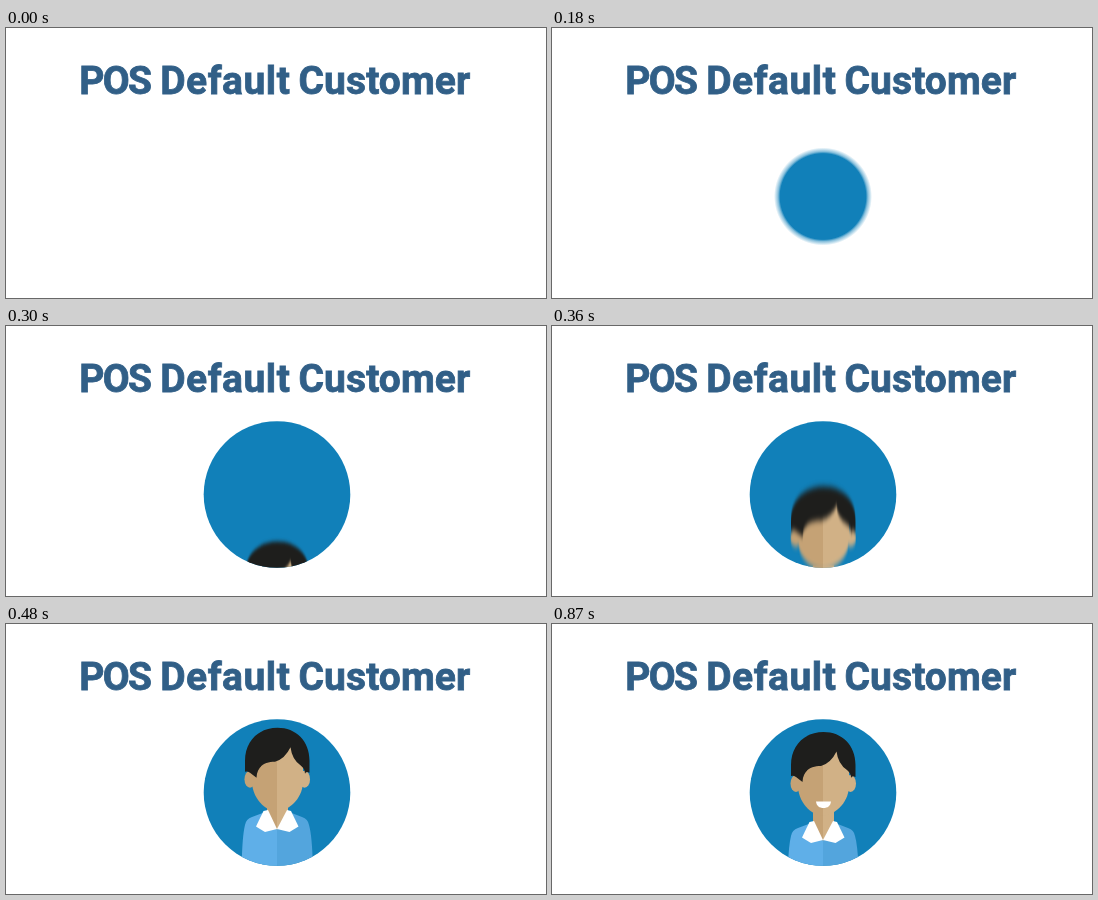
An HTML page for the animation above (3150 ms loop, 540 by 270 pixels).

```html
<!DOCTYPE html>
<html lang="en">
<head>
<meta charset="utf-8">
<title>POS Default Customer</title>
<style>
html, body { margin: 0; width: 100%; height: 100%; overflow: hidden; background: #fff; }
svg { display: block; width: 540px; height: 270px; }
text { font: 700 39px Roboto, "Open Sans", sans-serif; fill: #315f87; stroke: #315f87; stroke-width: 0.8px; }
.dark { fill: #c5a275; }
.light { fill: #d1b186; }
.white { fill: #fff; }
</style>
</head>
<body>
<svg viewBox="0 0 540 270">
  <defs>
    <clipPath id="disc"><circle cx="271" cy="168.5" r="73.3"/></clipPath>
    <radialGradient id="edge">
      <stop offset="1" stop-color="#1180b9"/>
      <stop offset="1" stop-color="#1180b9" stop-opacity="0.5"/>
      <stop offset="1" stop-color="#1180b9" stop-opacity="0"/>
    </radialGradient>
    <filter id="rise" filterUnits="userSpaceOnUse" x="150" y="-100" width="240" height="500" color-interpolation-filters="sRGB">
      <feGaussianBlur stdDeviation="0"/>
    </filter>
    <filter id="lift" filterUnits="userSpaceOnUse" x="150" y="-100" width="240" height="500" color-interpolation-filters="sRGB">
      <feGaussianBlur stdDeviation="0"/>
    </filter>
  </defs>

  <text y="65.5"><tspan x="73.2" letter-spacing="-1.6">POS</tspan><tspan x="154.2" letter-spacing="0.5">Default</tspan><tspan x="292.4" letter-spacing="0.1">Customer</tspan></text>

  <circle id="back" cx="271" cy="168.5" r="0"/>

  <g clip-path="url(#disc)">
    <g id="body">
      <path fill="#5fafe8" d="M259 199L246 204Q240 206 239 212Q235.500 226 235.500 270H271V199Z"/>
      <path fill="#53a5dd" d="M283 199L296 204Q302 206 303 212Q307 226 307 270H271V199Z"/>
      <path class="dark" d="M261 182H271V217L261 200Z"/>
      <path class="light" d="M271 182H282V200L271 217Z"/>
      <path class="white" d="M262 197L257.500 198L250 213.500L259 219L271 216Z"/>
      <path class="white" d="M281 197L285 198L292.500 213.500L283.500 219L271 216Z"/>
    </g>
    <g id="head">
      <ellipse class="dark" cx="244" cy="159.500" rx="5.500" ry="8.500"/>
      <ellipse class="light" cx="298.500" cy="159.500" rx="5.500" ry="8.500"/>
      <path class="dark" d="M271 125H246V163C247 180 260 191 271 192Z"/>
      <path class="light" d="M271 125H297V163C296 180 282 191 271 192Z"/>
      <path fill="#1e1e1c" d="M239 152V141C239 121 253 108 271.500 108C290 108 303.500 121 303.500 141V153Q300 151 299 154Q299 149 295 146Q286 140 284.500 127.500Q279 139 269 142C259 142 251 146 250.500 158L244 153Q241 151 239 152Z"/>
      <path id="smile" class="white" d="M264 177.500H279C278.500 182 275.500 184 271.500 184C267.500 184 264.500 182 264 177.500Z"/>
    </g>
  </g>
</svg>
<script>
const LOOP = 3150, STEP = 30;
const byId = id => document.getElementById(id);
const back = byId("back"), body = byId("body"), head = byId("head"), smile = byId("smile");
const stops = byId("edge").children;

const ease = (t, from, to) => {
  const u = Math.min(1, Math.max(0, (t - from) / (to - from)));
  return u * u * (3 - 2 * u);
};
const radius = t => 73.3 * ease(t, 15, 297);
// rise past the resting place, then settle
const headY = t => 125 - 130 * ease(t, 255, 450) + 5 * ease(t, 450, 570);
const bodyY = t => 60 - 71 * ease(t, 345, 480) + 11 * ease(t, 480, 600);
const speed = (f, t) => Math.abs(f(t + STEP / 2) - f(t - STEP / 2));

// the faster the disc grows, the wider its faded rim
function grow(t) {
  const r = radius(t), rim = Math.min(r, 0.024 * speed(radius, t) ** 2);
  const outer = r + rim;
  back.setAttribute("r", outer);
  back.setAttribute("fill", rim < 0.1 ? "#1180b9" : "url(#edge)");
  if (!outer) return;
  stops[0].setAttribute("offset", (r - rim) / outer);
  stops[1].setAttribute("offset", (r - 0.3 * rim) / outer);
}

function slide(el, id, f, t) {
  const blur = 0.1 * speed(f, t);
  el.setAttribute("transform", `translate(0 ${f(t)})`);
  if (blur < 0.25) return el.removeAttribute("filter");
  byId(id).firstElementChild.setAttribute("stdDeviation", `0 ${blur}`);
  el.setAttribute("filter", `url(#${id})`);
}

function draw(now) {
  const t = Math.floor(now % LOOP / STEP) * STEP;
  grow(t);
  slide(head, "rise", headY, t);
  slide(body, "lift", bodyY, t);
  head.style.display = t < 255 ? "none" : "";
  body.style.display = t < 345 ? "none" : "";

  const s = ease(t, 690, 870);
  smile.style.display = s ? "" : "none";
  smile.setAttribute("transform", `translate(271.5 180.500) scale(${s}) translate(-271.5 -180.500)`);
}

const start = performance.now();
function tick() {
  draw(performance.now() - start);
  requestAnimationFrame(tick);
}
tick();
</script>
</body>
</html>
```
